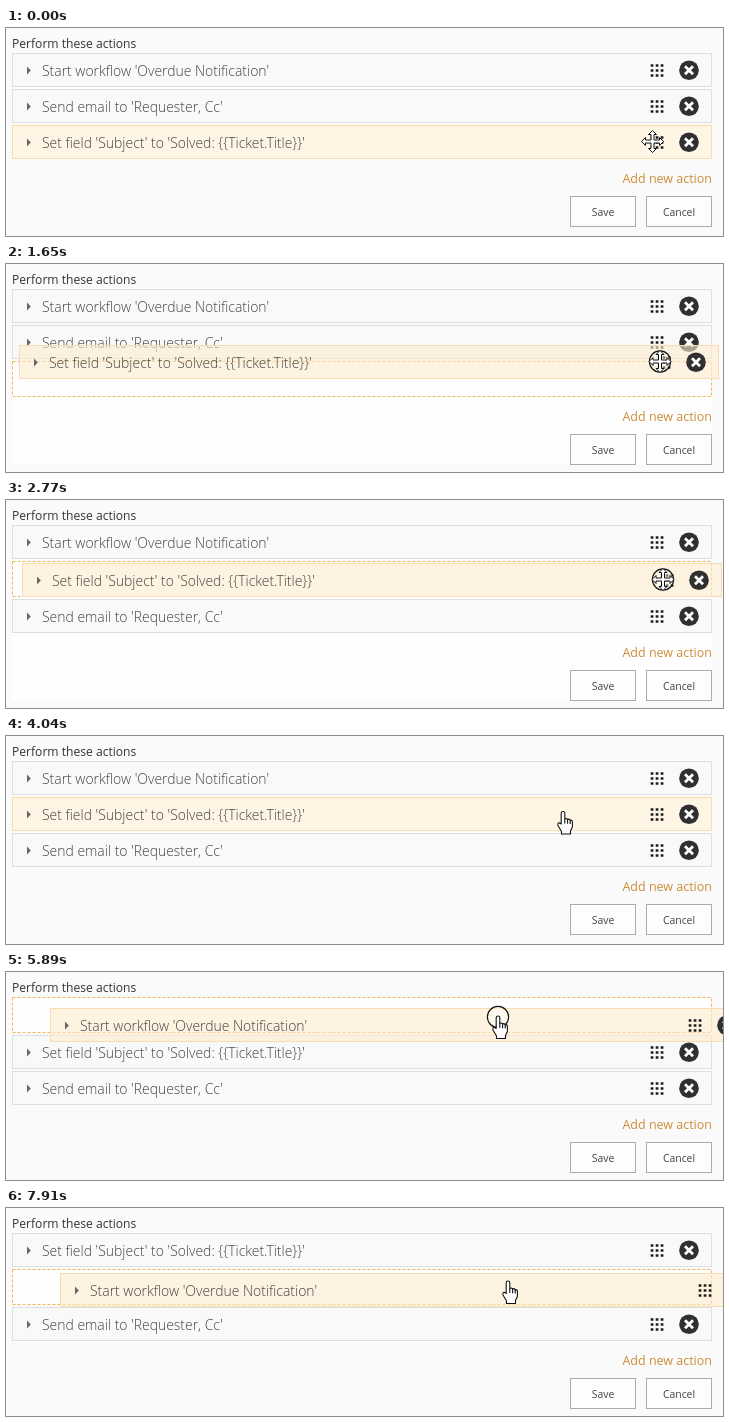
Recreate the animation shown at these times as an HTML page. Size 717 by 208 pixels, loop 8 s.

```html
<!DOCTYPE html>
<html lang="en">
<head>
<meta charset="utf-8">
<title>Reordering actions</title>
<style>
  html, body { margin: 0; width: 100%; height: 100%; overflow: hidden; background: #fafafa; }
  svg { display: block; font-family: "Open Sans", "Noto Sans", sans-serif; }
  .label { font-size: 13.95px; font-weight: 300; fill: #404040; }
  .button rect { fill: #fdfdfd; stroke: #ababab; }
  .button text { font-size: 10.4px; fill: #444; text-anchor: middle; }
  .box { fill: #f9f9f9; stroke: #dfdfdf; }
  .hover .box { fill: #fff5e4; stroke: #f7dfae; }
  .dragged .box { fill: rgb(255 236 205 / .6); stroke: #f6dcae; }
</style>
</head>
<body>
<svg width="717" height="208" viewBox="0 0 717 208">
  <defs>
    <g id="tools">
      <path d="M15 13.5 18.8 17.5 15 21.5Z" fill="#666"/>
      <path d="M638.7 12.5h13M638.7 17.5h13M638.7 22.5h13" stroke="#1d1d1d" stroke-width="2.7" stroke-dasharray="2.7 2.3"/>
      <circle cx="677" cy="17.3" r="9.8" fill="#303030"/>
      <path d="m673 13.3 8 8m0-8-8 8" stroke="#fff" stroke-width="2.8"/>
    </g>
  </defs>
  <rect width="717" height="208" fill="#fafafa"/>
  <rect id="panel" x="6" y="97" width="700" height="104" fill="#fefefe"/>
  <text x="6" y="20" font-size="12.1" fill="#333">Perform these actions</text>
  <g id="footer">
    <text x="706" y="155" font-size="12.5" fill="#cc8d38" text-anchor="end">Add new action</text>
    <g class="button"><rect x="564.5" y="168.5" width="65" height="30"/><text x="597" y="188">Save</text></g>
    <g class="button"><rect x="640.5" y="168.5" width="65" height="30"/><text x="673" y="188">Cancel</text></g>
  </g>
  <rect id="slot" x="6.5" width="699" height="35" fill="#fefefe" stroke="#f0b65a" stroke-dasharray="3 2"/>
  <g id="rows"></g>
  <g id="cursor">
    <circle id="ring" r="10.6" fill="#fff" fill-opacity=".4" stroke="#111" stroke-width="1.1"/>
    <path id="move" fill="#fff" stroke="#111" d="M0-11 4-7H1.5V-1.5H7V-4L11 0 7 4V1.5H1.5V7H4L0 11-4 7H-1.5V1.5H-7V4L-11 0-7-4V-1.5H-1.5V-7H-4Z"/>
    <g id="hand" stroke="#111" stroke-width="1.1" stroke-linejoin="round">
      <path fill="#fff" d="M-1.8 13V2.2Q-1.8.5 0 .5T1.8 2.2V8Q3.2 6.8 4.6 8.4 6 7.6 7.2 9.2 9.4 8.8 9.4 11V16L7.5 20V23H-1.5V20.5L-5 14.5Q-5.6 12-3.6 11.8Z"/>
      <path fill="none" d="M1.8 8v4.5M4.6 8.4v4.3M7.2 9.2v3.8"/>
    </g>
  </g>
</svg>
<script>
const LOOP = 8000;
const LIST = { x: 6, y: 25 };
const ROW_HEIGHT = 34, GAP = 2;
const labels = [
  "Start workflow 'Overdue Notification'",
  "Send email to 'Requester, Cc'",
  "Set field 'Subject' to 'Solved: {{Ticket.Title}}'"
];

const linear = p => p;
const easeOut = p => p * (2 - p);

// The pointer travels to each point in even steps, the first one taken at `start`.
const home = { x: 646.5, y: 113.5 };
const moves = [
  { start: 150, end: 270, steps: 2, x: 646.5, y: 115.5 },
  { start: 1100, end: 1650, steps: 5, x: 654, y: 97.5 },
  { start: 1800, end: 2490, steps: 6, x: 657, y: 79.5, ease: easeOut },
  { start: 3920, end: 4040, steps: 2, x: 557, y: 75, ease: easeOut },
  { start: 4190, end: 4550, steps: 4, x: 454, y: 32.5 },
  { start: 5230, end: 5740, steps: 5, x: 490, y: 39.5 },
  { start: 5890, end: 6440, steps: 5, x: 500, y: 59.5 },
  { start: 6590, end: 6950, steps: 4, x: 502, y: 72.5 }
];

// `grip` is where the pointer holds the row; `press` to `release` shows the ring.
const drags = [
  { row: 2, press: 980, start: 1100, release: 3080, end: 3080, grip: { x: 641, y: 16.5 } },
  { row: 0, press: 5110, start: 5230, release: 7910, end: LOOP, grip: { x: 448, y: 7.5 } }
];

const $ = id => document.getElementById(id);
const within = (t, from, to) => t >= from && t < to;
const place = (el, x, y) => el.setAttribute("transform", `translate(${x} ${y})`);
const show = (el, on) => el.setAttribute("visibility", on ? "visible" : "hidden");

$("rows").innerHTML = labels.map(label => `<g>
  <rect class="box" x=".5" y=".5" width="699" height="${ROW_HEIGHT - 1}"/>
  <text class="label" x="30" y="22.5">${label}</text>
  <use href="#tools"/></g>`).join("");
const rows = [...$("rows").children];

function pointerAt(t) {
  let { x, y } = home;
  for (const { start, end, steps, ease = linear, ...to } of moves) {
    if (t < start) break;
    const taken = 1 + Math.floor((t - start) / (end - start) * (steps - 1));
    const p = ease(Math.min(1, taken / steps));
    x += (to.x - x) * p;
    y += (to.y - y) * p;
  }
  return { x, y };
}

function orderAt(t) {
  if (t < 1800) return [0, 1, 2];
  return t < 6710 ? [0, 2, 1] : [2, 0, 1];
}

function render(t) {
  const { x, y } = pointerAt(t);
  const drag = drags.find(d => within(t, d.start, d.end));

  let top = LIST.y;
  for (const id of orderAt(t)) {
    const row = rows[id];
    if (drag?.row === id) {
      $("slot").setAttribute("y", top + .5);
      row.setAttribute("class", "dragged");
      place(row, Math.round(x - drag.grip.x), Math.round(y - drag.grip.y));
      if (row !== $("rows").lastElementChild) $("rows").append(row);
      top += ROW_HEIGHT + 2 * GAP;
    } else {
      const hover = !drag && within(y, top - 1, top + ROW_HEIGHT + 1);
      row.setAttribute("class", hover ? "hover" : "");
      place(row, LIST.x, top);
      top += ROW_HEIGHT + GAP;
    }
  }

  show($("slot"), drag);
  show($("panel"), drag === drags[0]);
  place($("footer"), 0, drag ? GAP : 0);

  const hand = t >= 3920;
  show($("hand"), hand);
  show($("move"), !hand);
  show($("ring"), drags.some(d => within(t, d.press, d.release)));
  place($("ring"), 0, hand ? 1.5 : 0);
  place($("cursor"), x, y);
}

function tick(now) {
  render(now % LOOP);
  requestAnimationFrame(tick);
}
render(0);
requestAnimationFrame(tick);
</script>
</body>
</html>
```
